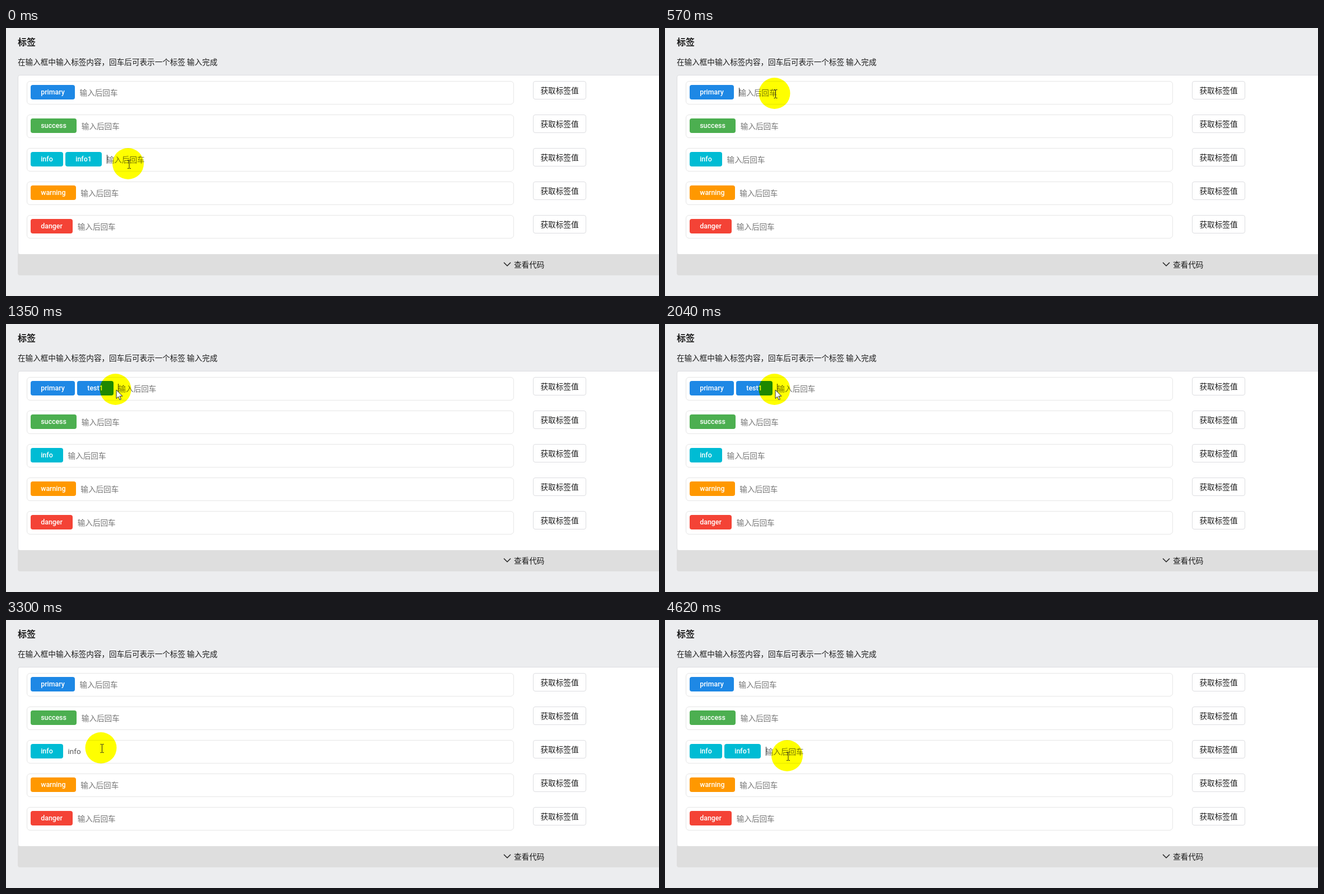
These frames come from a looping animation (1166x480 px, 4.65 s). An HTML page:

```html
<!DOCTYPE html>
<html lang="zh-CN">
<head>
<meta charset="utf-8">
<title>标签</title>
<style>
  * { box-sizing: border-box; }
  html, body { margin: 0; width: 100%; height: 100%; overflow: hidden; }
  body {
    position: relative;
    background: #ecedef;
    color: #1c1c1c;
    font: 13.6px/20px "Noto Sans CJK SC", "Noto Sans CJK", sans-serif;
    white-space: pre;
  }
  body > *, .box, .button { position: absolute; }
  h1 { left: 21px; top: 14px; margin: 0; font-size: 16px; line-height: 20px; font-weight: 700; }
  p { left: 21px; top: 50px; margin: 0; }
  #panel {
    left: 21px; top: 84px; width: 1200px; height: 322px;
    background: #fff; border: 1px solid #dcdde0; border-radius: 4px;
  }
  #footer {
    left: 21px; top: 405px; width: 1200px; height: 38px;
    background: #dedede; border-radius: 0 0 0 4px;
  }
  #footer svg { position: absolute; left: 867px; top: 13px; }
  #footer span { position: absolute; left: 886px; top: 8px; }
  #rows { left: 0; top: 0; }
  .box {
    left: 37px; width: 870px; height: 42px;
    border: 1.5px solid #e6e6e6; border-radius: 6px;
  }
  .line { position: absolute; left: 6px; top: 6px; height: 26px; display: flex; }
  .tag {
    height: 26px; margin-right: 4.2px; padding: 0 18.2px;
    border-radius: 4px; color: #fff;
    font: 500 12.4px/25px Roboto, sans-serif;
  }
  .input { position: relative; margin-left: 4.5px; padding-top: 2.8px; color: #757575; }
  .input.typed { color: #555; font: 13.4px/20px Roboto, sans-serif; padding-top: 3.5px; }
  .caret { position: absolute; top: 5px; width: 1px; height: 16px; background: #333; }
  .button {
    left: 941px; width: 95px; height: 33px;
    border: 1px solid #dcdde0; border-radius: 4px;
    text-align: center; line-height: 30px;
  }
  #halo {
    left: -28px; top: -28px; width: 56px; height: 56px;
    border-radius: 50%; background: #ff0; mix-blend-mode: multiply;
  }
  #pointer { left: 0; top: 0; overflow: visible; }
</style>
</head>
<body>
<h1>标签</h1>
<p>在输入框中输入标签内容，回车后可表示一个标签 输入完成</p>
<div id="panel"></div>
<div id="footer">
  <svg width="14" height="10" fill="none" stroke="#222" stroke-width="1.5"><path d="M1 2L7 8L13 2"/></svg>
  <span>查看代码</span>
</div>
<div id="rows"></div>
<div id="halo"></div>
<svg id="pointer" width="1" height="1">
  <path id="beam" fill="none" stroke="#222" d="M-1 -6.5h2.5M2.5 -6.5h2.5M2 -6v14M-1 8.5h2.5M2.5 8.5h2.5"/>
  <path id="arrow" fill="#fff" stroke="#222" d="M1.5 1v15.5l3.5-3.4l2.6 5.6l2.3-1.1l-2.5-5.4h5z"/>
</svg>
<script>
const LOOP = 4650, BLINK = 265, ROW_TOP = 95, ROW_STEP = 60;
const kinds = [
  ["primary", "#1e88e5"], ["success", "#4caf50"], ["info", "#00bcd4"],
  ["warning", "#ff9800"], ["danger", "#f44336"]
];

// [time, focused row, typed text, added tag]
const actions = [
  [30, -1, "", ""],
  [540, 0, "", ""],
  ...typing(0, "test1", [720, 820, 920, 1020, 1120]),
  [1290, 0, "", "test1"],
  [2050, 0, "", ""],
  [2860, 2, "", ""],
  ...typing(2, "info1", [2880, 2930, 2980, 3030, 3400]),
  [3560, 2, "", "info1"]
];

// [time, x, y]
const path = [
  [30, 330, 190], [450, 195.5, 117], [2250, 195.5, 117], [2500, 178.5, 113.5],
  [2620, 178.5, 113.5], [2850, 169.5, 229], [3330, 169.5, 229],
  [3740, 197.5, 239], [3800, 197.5, 239], [4250, 218, 243], [LOOP, 218, 243]
];

function typing(row, word, times) {
  return times.map((time, i) => [time, row, word.slice(0, i + 1), ""]);
}

const byId = id => document.getElementById(id);
byId("rows").innerHTML = kinds.map((_, i) => {
  const top = ROW_TOP + i * ROW_STEP;
  return `<div class="box" style="top:${top}px"><div class="line"></div></div>` +
    `<div class="button" style="top:${top}px">获取标签值</div>`;
}).join("");
const lines = [...document.querySelectorAll(".line")];

function drawRow(row, text, extra, caret) {
  const [name, color] = kinds[row];
  const tag = label => `<span class="tag" style="background:${color}">${label}</span>`;
  const mark = caret ? '<i class="caret"></i>' : "";
  const html = tag(name) + (extra && tag(extra)) +
    `<span class="input${text ? " typed" : ""}">` +
    (text ? text + mark : mark + "输入后回车") + "</span>";
  if (lines[row].shown !== html) lines[row].innerHTML = lines[row].shown = html;
}

function positionAt(t) {
  const i = path.findIndex(p => p[0] > t);
  const [t0, x0, y0] = path[i - 1], [t1, x1, y1] = path[i];
  const u = (t - t0) / (t1 - t0), ease = u * u * (3 - 2 * u);
  return [x0 + (x1 - x0) * ease, y0 + (y1 - y0) * ease];
}

function overInput(x, y) {
  return lines.some(line => {
    const r = line.lastElementChild.getBoundingClientRect();
    return x >= r.left && x < 905 && y >= r.top - 3 && y <= r.bottom + 3;
  });
}

function draw(time) {
  let t = time % LOOP;
  if (t < 30) t = LOOP - 30; // the loop opens on its closing pose

  const [since, focus, text, extra] = actions.filter(a => a[0] <= t).pop();
  const caretOn = Math.floor((t - since) / BLINK) % 2 === 0;
  kinds.forEach((_, row) => row === focus
    ? drawRow(row, text, extra, caretOn)
    : drawRow(row, "", "", false));

  const [x, y] = positionAt(t);
  const move = `translate(${x}px,${y}px)`;
  byId("halo").style.transform = byId("pointer").style.transform = move;
  const beam = overInput(x + 2, y + 1);
  byId("beam").style.display = beam ? "" : "none";
  byId("arrow").style.display = beam ? "none" : "";
}

const start = performance.now();
function frame() {
  draw(performance.now() - start);
  requestAnimationFrame(frame);
}
frame();
</script>
</body>
</html>
```
